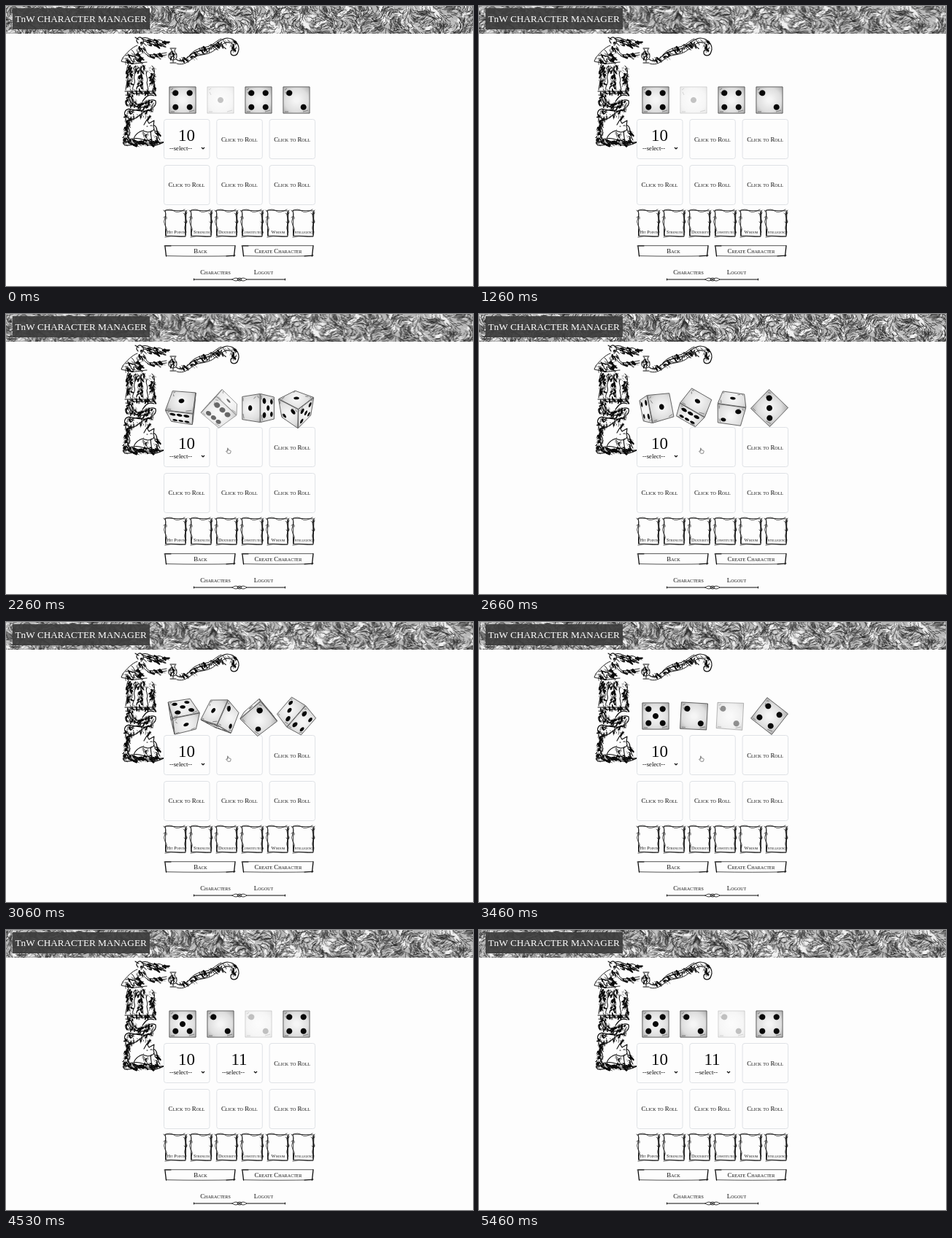
Write an HTML page with a canvas that moves like this. It is 640 px wide and 384 px high and loops after 5.6 s.

```html
<!DOCTYPE html>
<html lang="en">
<head>
<meta charset="utf-8">
<title>Character Manager</title>
<style>
html, body { margin: 0; width: 100%; height: 100%; overflow: hidden; background: #fdfdfd; }
canvas { display: block; width: 640px; height: 384px; }
</style>
</head>
<body>
<canvas id="stage" width="640" height="384"></canvas>
<script>
const LOOP = 5600, CLICK = 1930, RESULT = 4530;
const SERIF = '"Liberation Serif", "Noto Serif", serif';
const ctx = document.getElementById('stage').getContext('2d');

function seeded(seed) {
  return () => (seed = (seed * 16807) % 2147483647) / 2147483647;
}
function layer(w, h, paint) {
  const c = document.createElement('canvas');
  c.width = w;
  c.height = h;
  paint(c.getContext('2d'));
  return c;
}
function text(g, str, x, y, size, caps = true, align = 'center') {
  g.font = `${caps ? 'small-caps ' : ''}${size}px ${SERIF}`;
  g.textAlign = align;
  g.textBaseline = 'alphabetic';
  g.fillText(str, x, y);
}
function line(g, d, w = 1, color = '#0b0b0b') {
  g.strokeStyle = color;
  g.lineWidth = w;
  g.stroke(new Path2D(d));
}
function blob(g, x, y, rx, ry, angle, color) {
  g.beginPath();
  g.ellipse(x, y, rx, ry, angle, 0, 6.29);
  g.fillStyle = color;
  g.fill();
}

// Engraved forest strip that drifts behind the title
const forest = layer(720, 38, g => {
  const rnd = seeded(8123);
  const flow = (x, y) => 1.3 + Math.sin(x * .045 + y * .06) * 1.3 + Math.sin(x * .13 - y * .1) * .8;
  g.fillStyle = '#b8b8b8';
  g.fillRect(0, 0, 720, 38);
  for (let i = 0; i < 330; i++) {
    const x = rnd() * 720, y = rnd() * 38;
    const color = rnd() < .3 + x / 1800 ? '#f0f0f0' : '#777';
    blob(g, x, y, 3 + rnd() * 7, 1 + rnd() * 3, flow(x, y), color);
  }
  g.lineCap = 'round';
  for (let i = 0; i < 3300; i++) {
    let x = rnd() * 720, y = rnd() * 42 - 2, d = `M${x} ${y}`;
    const bend = rnd() - .5;
    for (let k = 0; k < 4; k++) {
      const a = flow(x, y) + bend * k;
      x += Math.cos(a) * 2;
      y += Math.sin(a) * 2;
      d += `L${x} ${y}`;
    }
    line(g, d, .4 + rnd() * .5, rnd() < .72 ? '#262626' : '#f4f4f4');
  }
});

function hatch(g, rnd, x, y, rx, ry, count, lean = 0) {
  for (let i = 0; i < count; i++) {
    const a = rnd() * 6.28, r = Math.sqrt(rnd());
    const px = x + Math.cos(a) * rx * r, py = y + Math.sin(a) * ry * r;
    const w = rnd() ** 3 * 2 + .4;
    line(g, `M${px} ${py}q${rnd() * 4 - 2 + lean} ${rnd() * 2} ${rnd() * 5 - 2.5 + lean * 2} ${1 + rnd() * 4}`, w);
  }
}

function ornament(g) {
  const rnd = seeded(417);
  g.lineCap = g.lineJoin = 'round';
  // figure with flowing hair and a vase
  line(g, 'M181 51c-5-5 1-10 5-7s2 8-1 10M177 43l5 3M187 44c9-3 13 6 20 3s9 5 14 4M188 48c8 0 12 7 19 5s7 4 12 3M186 45c8 2 10 5 17 4', 1.1);
  line(g, 'M180 54c-8 3-14 10-20 17l-2 5 9 2c9 3 19-1 26-1M188 55c5 4 3 9 7 11s14 0 25-2M186 60c4 5 9 10 17 10l17-3M172 60c7 5 3 14 11 17M164 68c7-2 12 1 17 5', .9);
  line(g, 'M225 58h8M226 59c4 4-5 5-3 11s11 5 11-1-5-6-2-10M223 66h11M229 73v4M225 78h8', 1);
  hatch(g, rnd, 174, 71, 14, 7, 55, 1);
  hatch(g, rnd, 184, 58, 6, 9, 22);
  hatch(g, rnd, 203, 50, 16, 4, 34, 2);
  hatch(g, rnd, 204, 67, 15, 3, 15, 2);
  hatch(g, rnd, 229, 66, 4, 5, 16);
  // ribbon
  line(g, 'M233 73c8 6 14-1 20-6s14-6 23-8 17-15 27-15 19 10 15 19c-2 7-11 6-10 0 1-4 5-4 6-1', 1.2);
  line(g, 'M234 79c10 3 16-3 23-8s16-3 25-8 13-12 21-13 12 5 8 12M252 67c7-8 14-9 23-11s12-8 20-11M262 64c5 5 13 2 18-5M285 52c1 6 7 5 11-3', .9);
  for (let i = 0; i < 10; i++) {
    hatch(g, rnd, 242 + i * 6.5, 73 - i * 2.9 + Math.sin(i) * 2, 5, 3, 8, 1);
  }
  hatch(g, rnd, 312, 54, 4, 9, 24);
  // paired standing figures
  line(g, 'M168 80c-6 8 2 15-2 23l-2 12M175 86c5 5-1 9 1 15s-4 9-2 14M185 83c-3 8 3 12 1 19l2 13M200 82c7 6 1 13 3 20l1 13M194 89c-5 6 2 9-1 16l2 10M163 117h42M166 120h37', 1);
  hatch(g, rnd, 169, 97, 5, 18, 58);
  hatch(g, rnd, 185, 86, 18, 5, 50);
  hatch(g, rnd, 184, 104, 4, 12, 34);
  hatch(g, rnd, 202, 99, 4, 17, 44);
  hatch(g, rnd, 184, 117, 20, 3, 32, 1);
  // coiled serpents
  line(g, 'M164 122c12 0 7 11 17 13s15-10 24-5c2 8-8 15-20 14s-19-6-22 1 9 13 16 8 13-13 22-8M168 125c3 13 17 18 29 10M171 145c5-4 13-3 19 0M203 123c-8-3-12 2-16 8', 1.2);
  hatch(g, rnd, 171, 130, 7, 9, 40);
  hatch(g, rnd, 193, 137, 11, 8, 56, -1);
  hatch(g, rnd, 169, 151, 6, 12, 42);
  hatch(g, rnd, 188, 150, 12, 3, 18);
  // fox at the base
  hatch(g, rnd, 166, 176, 5, 13, 40);
  hatch(g, rnd, 183, 186, 24, 4, 66, 2);
  blob(g, 183, 173, 11, 12, .4, '#fdfdfd');
  line(g, 'M189 163l4-7 3 5 7-4-1 8c3 5-2 8-8 8l-7-2c-9 3-14 10-11 17h24c0-7-3-13-1-17M165 150c-5 13 9 18 3 28s-11 8-5 13c13 1 22-5 31-1s19-2 25-4M161 182c9 2 15-2 22 0s25 7 35 4M202 163c8 3 3 14 9 21M193 165h1M198 164h2', 1.1);
  hatch(g, rnd, 191, 177, 5, 9, 20);
  hatch(g, rnd, 205, 176, 3, 10, 18, 1);
}

function statCard(g, x, label) {
  g.save();
  g.beginPath();
  g.rect(x - 1, 276, 34, 44);
  g.clip();
  line(g, `M${x + 3} 280l28 1-1 35-27-1z`, .8);
  line(g, `M${x + 3} 315v-9M${x + 30} 283v31`, 1.3);
  line(g, `M${x} 280q5 4 2 10t0 11q4 5 1 9M${x + 1} 281q8-4 13 0t15-2M${x + 32} 280q-5 5-2 10t0 10q-3 5 1 10M${x} 290q5-4 4 2M${x + 27} 284q4 5 5-1M${x + 28} 296q4 5 4-1M${x + 2} 317q9-2 15-1t13 0`, .7);
  g.fillStyle = '#111';
  text(g, label, x + 17, 311.8, 6.3);
  g.restore();
}

function button(g, x, w, label) {
  line(g, `M${x + 1} 328.7h${w - 2}M${x + 3} 342.7q${w / 2} 1 ${w - 5} 0`, .7);
  line(g, `M${x + 1} 330l1.5 13M${x + w - 1} 329l-1.5 14`, 1.3);
  line(g, `M${x} 329h9M${x + w - 13} 343l12-1`, 1);
  text(g, label, x + w / 2 + .5, 339, 8.9);
}

const page = layer(640, 384, g => {
  g.fillStyle = '#fdfdfd';
  g.fillRect(0, 0, 640, 384);
  ornament(g);
  for (let i = 0; i < 6; i++) {
    g.beginPath();
    g.roundRect(216.5 + (i % 3) * 72.3, i < 3 ? 155.5 : 218.5, 62.5, 54, 3);
    g.fillStyle = '#fdfdfd';
    g.fill();
    g.strokeStyle = '#dfe2e6';
    g.lineWidth = 1;
    g.stroke();
    g.fillStyle = '#111';
    if (i > 1) text(g, 'Click to Roll', 247.5 + (i % 3) * 72.3, i < 3 ? 185.5 : 248, 8.9);
  }
  ['Hit Points', 'Strength', 'Dexterity', 'Constitution', 'Wisdom', 'Intelligence']
    .forEach((label, i) => statCard(g, 216 + i * 35, label));
  button(g, 217, 98, 'Back');
  button(g, 323, 99, 'Create Character');
  text(g, 'Characters', 287, 368, 8.9);
  text(g, 'Logout', 353, 368, 8.9);
  line(g, 'M258 375h52M330 375h52M257.5 374v2M382.5 374v2', 1);
  line(g, 'M310 375q5-4 10 0t10 0q-5-4-10 0t-10 0M317 375a3 2 0 1 0 6 0a3 2 0 1 0-6 0', .8);
});

// Quaternions, written as CSS-like rotation lists such as "z8 x38"
function mul([a, b, c, d], [e, f, g, h]) {
  return [a * e - b * f - c * g - d * h, a * f + b * e + c * h - d * g,
    a * g - b * h + c * e + d * f, a * h + b * g - c * f + d * e];
}
function pose(spec) {
  return spec.split(' ').filter(Boolean).reduce((q, part) => {
    const half = parseFloat(part.slice(1)) * Math.PI / 360, r = [Math.cos(half), 0, 0, 0];
    r['xyz'.indexOf(part[0]) + 1] = Math.sin(half);
    return mul(q, r);
  }, [1, 0, 0, 0]);
}
function rotate([w, x, y, z], v) {
  return mul(mul([w, x, y, z], [0, ...v]), [w, -x, -y, -z]).slice(1);
}
function slerp(a, b, k) {
  let dot = a.reduce((s, v, i) => s + v * b[i], 0);
  const sign = dot < 0 ? -1 : 1;
  dot = Math.min(1, Math.abs(dot));
  const th = Math.acos(dot);
  if (th < .001) return b;
  const s = Math.sin(th);
  return a.map((v, i) => (v * Math.sin((1 - k) * th) + sign * b[i] * Math.sin(k * th)) / s);
}

const HALF = 18.5, VIEW = 100;
const FACES = ['', 'y90', 'y180', 'y-90', 'x90', 'x-90'].map(pose);
const PIPS = ['4', '08', '048', '0268', '02468', '012678'];
const KEYS = [CLICK, 2260, 2660, 3460, 4260];
const DICE = [
  ['y90', 'z13 x32 y-12', 'z-11 y28', 'x-90', 'x-90'],
  ['', 'z25 x60 y20', 'z30 x38', 'z3 y-88', 'y-90'],
  ['y90', 'y-40 z90', 'z8 x52 z90', 'z3 y-98', 'y-90'],
  ['y-90', 'x52 z130', 'z44 y180', 'z38 y90', 'y90']
].map(list => list.map(pose));

const clamp = v => Math.max(0, Math.min(1, v));

function dieTurn(keys, t) {
  if (t <= KEYS[0]) return keys[0];
  if (t >= KEYS[4]) return keys[4];
  const i = KEYS.findIndex((k, n) => t < KEYS[n + 1]);
  const k = (t - KEYS[i]) / (KEYS[i + 1] - KEYS[i]);
  return slerp(keys[i], keys[i + 1], i === 3 ? 1 - (1 - k) ** 2 : k);
}

function dieAlpha(i, t) {
  if (i === 1) return .23 + .77 * clamp((t - CLICK) / 700);
  if (i === 2) return 1 - .77 * clamp((t - 3100) / 480);
  return 1;
}

// Perspective keeps a face that looks straight ahead at full size
function project(q, x, y) {
  const [px, py, pz] = rotate(q, [x, y, HALF]);
  const s = VIEW / (VIEW + HALF - pz);
  return [px * s, py * s];
}
function trace(q, points) {
  ctx.beginPath();
  points.forEach(([x, y]) => ctx.lineTo(...project(q, x, y)));
  ctx.closePath();
}
function circle(cx, cy, r) {
  return Array.from({ length: 24 }, (_, i) => [cx + r * Math.cos(i * Math.PI / 12), cy + r * Math.sin(i * Math.PI / 12)]);
}

function drawFace(q, value) {
  const [cx, cy] = project(q, 0, 0);
  const shade = ctx.createRadialGradient(cx, cy, 3, cx, cy, 27);
  shade.addColorStop(0, '#f5f5f5');
  shade.addColorStop(.55, '#dedede');
  shade.addColorStop(1, '#a2a2a2');
  const e = HALF - .4;
  trace(q, [[-e, -e], [e, -e], [e, e], [-e, e]]);
  ctx.fillStyle = shade;
  ctx.fill();
  ctx.lineWidth = .9;
  ctx.strokeStyle = '#555';
  ctx.stroke();
  ctx.lineWidth = .6;
  ctx.strokeStyle = '#777';
  for (const scratch of [[[-16, -14], [-13, -16]], [[-15, -11], [-13, -7]], [[9, 16], [16, 14]], [[-16, 16], [-11, 16]]]) {
    trace(q, scratch);
    ctx.stroke();
  }
  ctx.fillStyle = '#080808';
  for (const p of PIPS[value]) {
    trace(q, circle((p % 3 - 1) * 9.7, (Math.floor(p / 3) - 1) * 9.7, 4));
    ctx.fill();
  }
}

function drawDie(i, t) {
  const turn = dieTurn(DICE[i], t);
  ctx.save();
  ctx.globalAlpha = dieAlpha(i, t);
  ctx.translate(242 + i * 52, 129);
  FACES.forEach((face, value) => {
    const q = mul(turn, face);
    const facing = rotate(q, [0, 0, 1])[2] * (VIEW + HALF) - HALF;
    if (facing > .3) drawFace(q, value);
  });
  ctx.restore();
}

function drawScore(x, score) {
  ctx.fillStyle = '#0b0b0b';
  text(ctx, score, x, 184.5, 23, false);
  text(ctx, '--select--', x - 23.5, 197.5, 8.6, false, 'left');
  line(ctx, `M${x + 20.5} 194l2 2 2-2`, 1.2);
}

function drawCursor() {
  const hand = new Path2D('M303.5 184.5q0-1.5 1 0v2l3 .7q1 .3.5 2l-.8 2h-3.2l-2.5-3q0-1.2 2 .2z');
  ctx.fillStyle = '#fff';
  ctx.fill(hand);
  ctx.strokeStyle = '#555';
  ctx.lineWidth = .7;
  ctx.stroke(hand);
}

function drawHeader(t) {
  ctx.drawImage(forest, t * .006 - 60, 0);
  ctx.fillStyle = 'rgba(60,60,60,.92)';
  ctx.fillRect(9, 3, 188, 29);
  ctx.fillStyle = '#fff';
  text(ctx, 'TnW CHARACTER MANAGER', 12.5, 22, 13.2, false, 'left');
}

// The picture advances in uneven steps with a few longer holds
function step(t) {
  if (t < 60) return 0;
  for (const [from, to] of [[60, 260], [1660, CLICK], [4260, RESULT]]) {
    if (t >= from && t < to) return from;
  }
  if (t >= RESULT && t < 4600) return RESULT;
  const [a, b] = t < 2000 ? [60, 130] : [0, 60];
  const base = Math.floor((t - a) / 200) * 200 + a;
  return t - base < b - a ? base : base + b - a;
}

function draw(now) {
  const t = step(now % LOOP);
  ctx.drawImage(page, 0, 0);
  drawHeader(t);
  DICE.forEach((_, i) => drawDie(i, t));
  drawScore(247.5, '10');
  if (t < CLICK) {
    ctx.fillStyle = '#111';
    text(ctx, 'Click to Roll', 319.8, 185.5, 8.9);
  } else if (t < RESULT) {
    drawCursor();
  } else {
    drawScore(319.5, '11');
  }
}

const start = performance.now();
function tick() {
  draw(performance.now() - start);
  requestAnimationFrame(tick);
}
tick();
</script>
</body>
</html>
```
